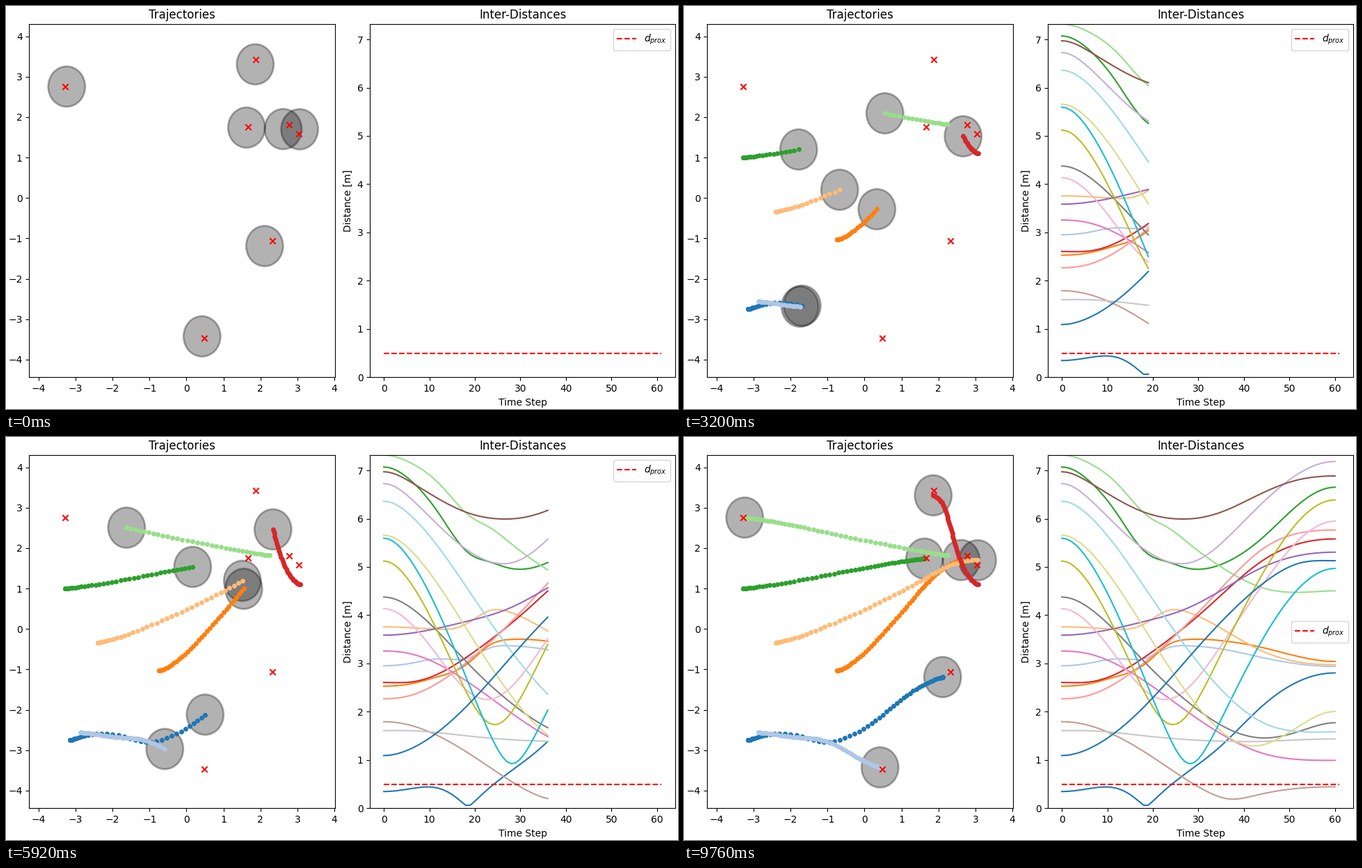
A matplotlib script for the animation above (9.92 s loop, 966 px wide and 580 px high).

```python
from itertools import combinations

import matplotlib.pyplot as plt
import numpy as np
from matplotlib.animation import FuncAnimation
from matplotlib.patches import Circle

W, H, DPI = 966, 580, 100
STEPS = 61
INTERVAL = 160
RADIUS = 0.5
D_PROX = 0.5

BASE = (0, 6, 19, 28, 36, 44, 60)

# Waypoints of each agent: (steps, x, y)
WAYPOINTS = [
    ((0, 6, 12, 15, 19, 23, 28, 36, 44, 60),
     (-3.146, -3.03, -2.66, -2.30, -1.685, -1.095, -0.40, 0.504, 1.228, 2.113),
     (-2.755, -2.72, -2.625, -2.59, -2.665, -2.80, -2.65, -2.12, -1.586, -1.19)),
    (BASE,
     (-2.86, -2.647, -1.744, -1.17, -0.587, -0.107, 0.42),
     (-2.56, -2.583, -2.69, -2.746, -2.97, -3.228, -3.425)),
    (BASE,
     (-0.747, -0.578, 0.335, 1.003, 1.548, 2.028, 2.615),
     (-1.035, -0.984, -0.279, 0.409, 0.994, 1.432, 1.705)),
    (BASE,
     (-2.40, -2.149, -0.672, 0.542, 1.511, 2.292, 3.06),
     (-0.339, -0.296, 0.203, 0.719, 1.192, 1.57, 1.70)),
    (BASE,
     (-3.29, -3.07, -1.782, -0.709, 0.166, 0.909, 1.624),
     (1.0, 1.02, 1.20, 1.39, 1.536, 1.656, 1.742)),
    (BASE,
     (2.245, 1.98, 0.551, -0.643, -1.62, -2.43, -3.24),
     (1.82, 1.854, 2.095, 2.31, 2.507, 2.65, 2.757)),
    (BASE[:-1] + (52, 60),
     (3.07, 2.988, 2.668, 2.48, 2.339, 2.207, 2.04, 1.859),
     (1.105, 1.14, 1.527, 2.01, 2.464, 2.877, 3.19, 3.307)),
]

GOALS = np.array([
    (2.329, -1.07), (0.476, -3.477), (2.781, 1.802), (3.044, 1.587),
    (1.671, 1.759), (-3.287, 2.75), (1.878, 3.419),
])


def spline(t, p, s):
    """Cubic spline through (t, p), at rest at both ends, sampled at s."""
    t, p = np.asarray(t, float), np.asarray(p, float)
    n, h, d = len(t), np.diff(t), np.diff(p) / np.diff(t)
    a, b = np.eye(n), np.zeros(n)
    for i in range(1, n - 1):
        a[i, i - 1:i + 2] = h[i], 2 * (h[i - 1] + h[i]), h[i - 1]
        b[i] = 3 * (h[i] * d[i - 1] + h[i - 1] * d[i])
    v = np.linalg.solve(a, b)
    k = np.clip(np.searchsorted(t, s, side="right") - 1, 0, n - 2)
    u = (s - t[k]) / h[k]
    return ((1 + 2 * u) * (1 - u) ** 2 * p[k] + u * (1 - u) ** 2 * h[k] * v[k]
            + u * u * (3 - 2 * u) * p[k + 1] + u * u * (u - 1) * h[k] * v[k + 1])


time = np.arange(STEPS)
paths = [np.column_stack([spline(t, x, time), spline(t, y, time)])
         for t, x, y in WAYPOINTS]
dists = [np.hypot(*(paths[i] - paths[j]).T)
         for i, j in combinations(range(len(paths)), 2)]

colors = plt.get_cmap("tab20").colors
fig = plt.figure(figsize=(W / DPI, H / DPI), dpi=DPI, facecolor="white")


def add_axes(left, title):
    ax = fig.add_axes([left / W, (H - 534.3) / H, 439.3 / W, 507.8 / H])
    ax.set_title(title)
    return ax


ax_map = add_axes(33.3, "Trajectories")
ax_map.set_xlim(-4.255, 4.01)
ax_map.set_ylim(-4.437, 4.295)

ax_dist = add_axes(523.1, "Inter-Distances")
ax_dist.set_xlim(-3.05, 64.05)
ax_dist.set_ylim(0, 7.31)
ax_dist.set_xlabel("Time Step")
ax_dist.set_ylabel("Distance [m]")

circles = [ax_map.add_patch(Circle(p[-1], RADIUS, color="black", alpha=0.3, lw=2))
           for p in paths]
trails = [ax_map.plot([], [], "o", ms=4, color=colors[i])[0]
          for i in range(len(paths))]
ax_map.scatter(*GOALS.T, marker="x", color="red", zorder=3)

curves = [ax_dist.plot([], [], color=colors[i % 20])[0]
          for i in range(len(dists))]
ax_dist.plot([0, STEPS], [D_PROX, D_PROX], "r--", label="$d_{prox}$")
ax_dist.legend(loc="best")


def update(n):
    # With no steps taken yet, index -1 puts the circles at their end points.
    for path, circle, trail in zip(paths, circles, trails):
        circle.center = path[n - 1]
        trail.set_data(path[:n, 0], path[:n, 1])
    for dist, curve in zip(dists, curves):
        curve.set_data(time[:n], dist[:n])
    return circles + trails + curves


anim = FuncAnimation(fig, update, frames=STEPS + 1, interval=INTERVAL,
                     repeat=True, repeat_delay=0, blit=False)
plt.show()
```
